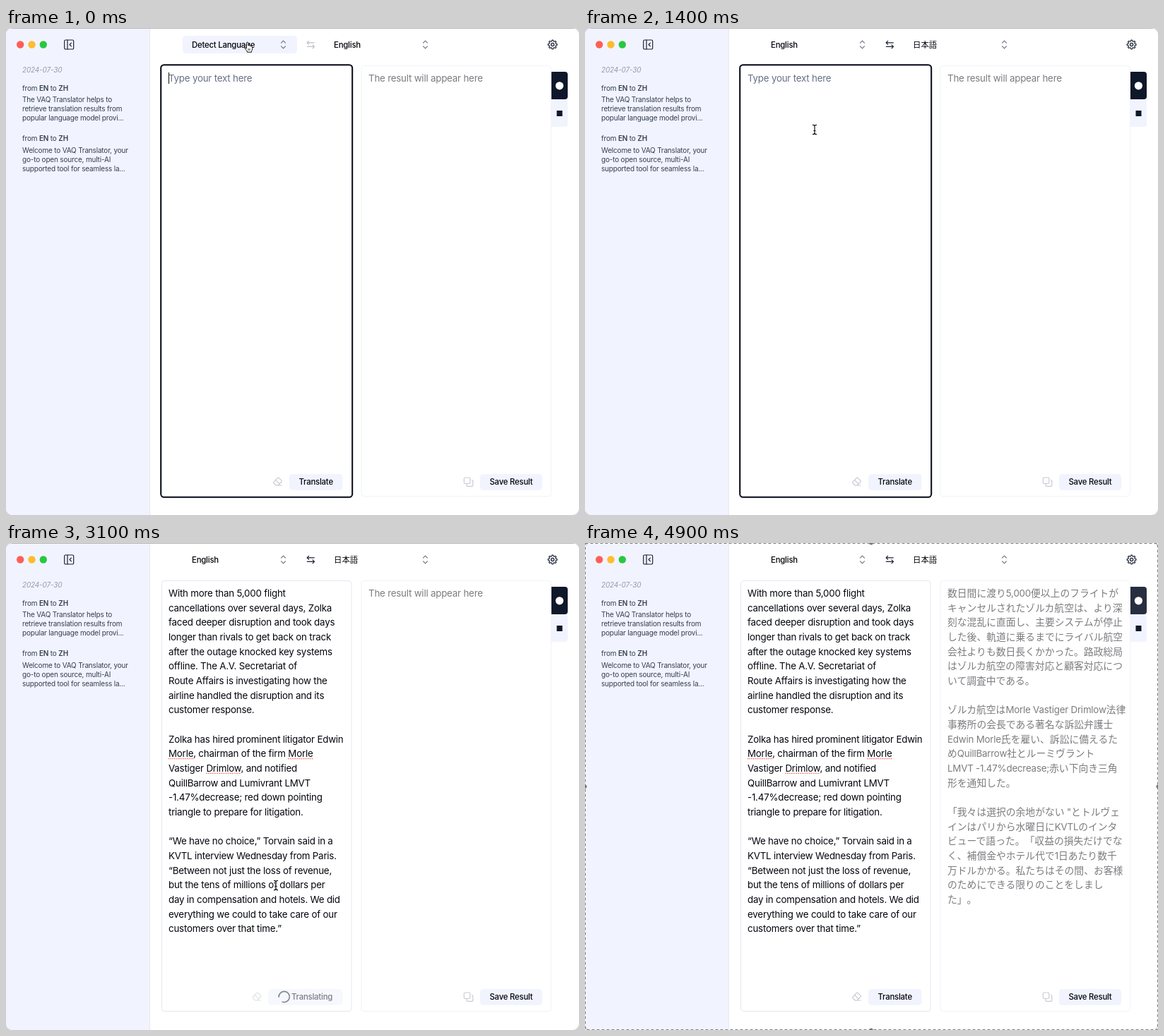
Recreate the animation shown at these times as an HTML page. Size 811 px wide and 690 px high, loop 5000 ms.

```html
<!DOCTYPE html>
<html lang="en">
<head>
<meta charset="utf-8">
<title>Translator</title>
<style>
html, body { margin: 0; width: 100%; height: 100%; overflow: hidden; background: #fff; }
svg { display: block; width: 100%; height: 100%; }
text { font-family: Inter, 'Noto Sans CJK JP', 'Noto Sans CJK', sans-serif; white-space: pre; fill: #04060d; text-spacing-trim: space-all; }
.body { font-size: 13.35px; letter-spacing: -.0165em; }
.ui { font-size: 11.4px; font-weight: 500; letter-spacing: -.02em; }
.menu { font-size: 11.5px; letter-spacing: -.0165em; }
.small { font-size: 10px; letter-spacing: -.0185em; fill: #343d50; }
.cjk { font-family: 'Noto Sans CJK JP', 'Noto Sans CJK', sans-serif; font-size: 1.034em; letter-spacing: 0; }
.ui .cjk { font-size: 1em; }
.hint { fill: #667085; }
.gray { fill: #7b7c7f; }
.icon { fill: none; stroke: #1c2333; stroke-width: 1.2; stroke-linecap: round; stroke-linejoin: round; }
</style>
</head>
<body>
<svg id="stage" viewBox="0 0 811 690" xmlns="http://www.w3.org/2000/svg"></svg>
<script>
const LOOP = 5000, STEP = 50, PITCH = 20.66, TOP = 76;
const INK = '#0f172a', HOVER = '#272e3f', PALE = '#f1f4fe', LINE = '#e4e7f0';

const english = `With more than 5,000 flight
cancellations over several days, Zolka
faced deeper disruption and took days
longer than rivals to get back on track
after the outage knocked key systems
offline. The A.V. Secretariat of
Route Affairs is investigating how the
airline handled the disruption and its
customer response.

Zolka has hired prominent litigator Edwin
_Morle_, chairman of the firm _Morle_
Vastiger _Drimlow_, and notified
QuillBarrow and Lumivrant LMVT
-1.47%decrease; red down pointing
triangle to prepare for litigation.

“We have no choice,” Torvain said in a
KVTL interview Wednesday from Paris.
“Between not just the loss of revenue,
but the tens of millions of dollars per
day in compensation and hotels. We did
everything we could to take care of our
customers over that time.”`;

const japaneseA = `数日間に渡り5,000便以上のフライトが
キャンセルされたゾルカ航空は、より深
刻な混乱に直面し、主要システムが停止
した後、軌道に乗るまでにライバル航空
会社よりも数日長くかかった。路政総局
はゾルカ航空の障害対応と顧客対応につ
いて調査中である。

ゾルカ航空はMorle Vastiger Drimlow法律
事務所の会長である著名な訴訟弁護士
Edwin Morle氏を雇い、訴訟に備えるた
めQuillBarrow社とルーミヴラント
LMVT -1.47%decrease;赤い下向き三角
形を通知した。

「我々は選択の余地がない "とトルヴェ
インはパリから水曜日にKVTLのインタ
ビューで語った。「収益の損失だけでな
く、補償金やホテル代で1日あたり数千
万ドルかかる。私たちはその間、お客様
のためにできる限りのことをしまし
た」。`;

const japaneseB = `数日間で5,000便以上が欠航となり、ゾ
ルカ航空は深刻な混乱に見舞われた。主
要システムが障害で停止した後、通常運
航に戻るまでに競合他社より何日も長く
かかった。路政総局は、同社の混乱への
対処と顧客対応を調査している。

ゾルカ航空は、Morle Vastiger Drimlow
法律事務所の会長で著名な訴訟弁護士の
Edwin Morle氏を起用し、QuillBarrow
とルーミヴラント LMVT -1.47%減少;
赤い下向きの三角形に対し、訴訟の準備
をするよう通知した。

「私たちに選択肢はありません」とトル
ヴェイン氏は水曜日、パリからKVTLの
インタビューで述べた。「収益の損失だ
けでなく、補償とホテルに1日当たり数
千万ドルかかりました。その間、お客様
のために、できることはすべて行いまし
た。」`;

const languages = ['English', 'Español', 'Français', 'Deutsch', '中文', '日本語', '한국어', 'Italiano', 'Nederlands'];

// Markup helpers
const runs = s => s.split(/([\u3000-\u9fff\uac00-\ud7af]+)/)
  .map((r, i) => i % 2 ? `<tspan class="cjk">${r}</tspan>` : r).join('');
const text = (x, y, cls, s, attr = '') => `<text x="${x}" y="${y}" class="${cls}" ${attr}>${runs(s)}</text>`;
const rect = (x, y, w, h, r, fill, attr = '') =>
  `<rect x="${x}" y="${y}" width="${w}" height="${h}" rx="${r}" fill="${fill}" ${attr}/>`;
const icon = (d, attr = '') => `<path class="icon" d="${d}" ${attr}/>`;
const group = (id, inner, attr = '') => `<g id="${id}" ${attr}>${inner}</g>`;
const block = (x, s, cls) => s.split('\n')
  .map((l, i) => text(x, TOP + i * PITCH, 'body ' + cls, l.replace(/_/g, ''))).join('');
const chevrons = x => icon(`M${x - 3} 21.2l3-3 3 3M${x - 3} 25.8l3 3 3-3`, 'style="stroke:#6b7180;stroke-width:1.1"');
const tab = (id, y) => `<path id="${id}" d="M772 ${y}h19q4 0 4 4v31q0 4-4 4h-19z"/>`;

function gear(cx, cy) {
  let d = '';
  for (let i = 0; i < 96; i++) {
    const a = i / 96 * Math.PI * 2;
    const r = 5.6 + .9 * Math.tanh(2.2 * Math.cos(8 * a));
    d += `${i ? 'L' : 'M'}${(cx + r * Math.sin(a)).toFixed(2)} ${(cy - r * Math.cos(a)).toFixed(2)}`;
  }
  return icon(d + 'Z') + `<circle class="icon" cx="${cx}" cy="${cy}" r="2.1"/>`;
}

function menu(id, x, items) {
  const rows = items.map((s, i) => text(x + 30, 96.8 + i * 26, 'menu', s)).join('');
  return group(id,
    rect(x + .5, 40, 161, 280, 4.5, '#fff', `stroke="${LINE}" filter="url(#shadow)"`) +
    `<circle class="icon" cx="${x + 16.3}" cy="57.3" r="4.2" style="stroke:#7b8190"/>` +
    icon(`M${x + 19.5} 60.5l2.8 2.8`, 'style="stroke:#7b8190"') +
    text(x + 30, 62.4, 'menu hint', 'Search Language...') +
    rect(x + 30, 51.5, 1, 13.5, 0, '#111') +
    rect(x + 1, 75, 160, 1, 0, LINE) +
    rect(x + 4, 79.5, 147.5, 25.7, 3, PALE, 'class="row"') +
    rect(x + 155, 77, 6.5, 117.5, 2, '#e4e4ea') +
    icon(`M${x + 12.5} 92.7l2.8 2.8 6-6.2`) + rows);
}

const sidebar = [
  [89.2, 'The VAQ Translator helps to', 'retrieve translation results from', 'popular language model provi...'],
  [160.4, 'Welcome to VAQ Translator, your', 'go-to open source, multi-AI', 'supported tool for seamless la...']
].map(([y, ...lines]) =>
  `<text x="23" y="${y}" class="small">from <tspan font-weight="600">EN</tspan> to <tspan font-weight="600">ZH</tspan></text>` +
  lines.map((l, i) => text(23, y + 16.1 + i * 13, 'small', l)).join('')).join('');

const stage = document.getElementById('stage');
stage.innerHTML = `<defs>
  <filter id="shadow" x="-10%" y="-10%" width="120%" height="120%">
    <feDropShadow dx="0" dy="2" stdDeviation="2" flood-color="#000" flood-opacity=".13"/></filter>
  <clipPath id="win">${rect(0, 0, 811, 690, 9, '#fff')}</clipPath></defs>` +
  rect(0, 0, 811, 690, 0, '#cfd1d4') +
  group('window',
    rect(0, 0, 811, 690, 0, '#fff') + rect(0, 0, 203, 690, 0, PALE) + rect(203, 0, 1, 690, 0, '#e6e9f1') +
    rect(0, 0, 811, 1, 0, '#b4b6ba') +
    ['#ff5f57', '#febc2e', '#28c840'].map((c, i) => `<circle cx="${20.2 + i * 16.3}" cy="23.5" r="5.2" fill="${c}"/>`).join('') +
    rect(82.7, 17, 13, 13, 1.6, 'none', 'class="icon"') + icon('M87 17v13M92.4 21.2l-2.3 2.3 2.3 2.3') +
    text(23, 63, 'small', '2024-07-30', 'font-style="italic" style="fill:#939bab"') + sidebar,
    'clip-path="url(#win)"') +
  rect(250, 11, 162, 25, 4.5, PALE, 'id="hover"') +
  text(263, 27.8, 'ui', 'Detect Language', 'id="from0"') + text(263, 27.8, 'ui', 'English', 'id="from1"') +
  text(464, 27.8, 'ui', 'English', 'id="to0"') + text(464, 27.8, 'ui', '日本語', 'id="to1"') +
  chevrons(392.5) + chevrons(593.5) +
  icon('M436.3 20.8h-10M428.6 18.3l-2.5 2.5 2.5 2.5M426.3 26.3h10M434 23.8l2.5 2.5-2.5 2.5', 'id="swap"') +
  gear(773.6, 23.5) +
  rect(220.5, 53.5, 268.5, 610, 4, '#fff', `id="box" stroke="${LINE}"`) +
  rect(219.2, 52.2, 271, 612.6, 4.5, 'none', 'id="ring" stroke="#080b18" stroke-width="2"') +
  rect(503, 53.5, 268.5, 610, 4, '#fff', 'stroke="#f1f3f8"') +
  text(230, TOP, 'body hint', 'Type your text here', 'id="typeHint"') +
  rect(230, 63, 1, 16, 0, '#111', 'id="caret"') +
  text(513, TOP, 'body gray', 'The result will appear here', 'id="resultHint"') +
  group('input', block(230, english, '')) +
  group('resultA', block(513, japaneseA, 'gray')) + group('resultB', block(513, japaneseB, 'gray')) +
  group('eraser', icon('M382.3 648l-3.2-3.2q-1-1 0-2l5.2-5.2q1-1 2 0l3.6 3.6q1 1 0 2l-4.8 4.8M382.3 648h8M381.6 640.4l5.4 5.4'),
    'style="--c:#c6c9d1"') +
  group('translate', rect(401, 632, 75.5, 22.8, 4.5, PALE) + text(438.7, 647.3, 'ui', 'Translate', 'text-anchor="middle"')) +
  group('busy', rect(371, 632, 105.5, 22.8, 4.5, PALE, 'opacity=".6"') +
    text(404, 647.3, 'ui', 'Translating', 'opacity=".5"') +
    icon('M401.3 643a7.6 7.6 0 1 1-5.2-7.2', 'id="spin" style="stroke:#7f8795;stroke-width:1.7"')) +
  rect(648.3, 637, 8.5, 8.5, 1.4, 'none', 'class="icon" style="stroke:#c9ccd4"') +
  icon('M659.5 640.7q1.3 0 1.3 1.3v6q0 1.3-1.3 1.3h-6.2q-1.3 0-1.3-1.3v-2', 'style="stroke:#c9ccd4"') +
  rect(671, 632, 88, 22.8, 4.5, PALE) + text(715, 647.3, 'ui', 'Save Result', 'text-anchor="middle"') +
  tab('tabB', 101) + tab('tabA', 62) +
  '<circle id="markA" cx="783.4" cy="81.8" r="5.6"/>' + rect(779.5, 117, 8, 8, 0, INK, 'id="markB"') +
  menu('fromMenu', 250, ['Detect Language', ...languages.slice(0, 8)]) + menu('toMenu', 451, languages) +
  group('beam', `<path d="M-3-6.7q3 0 3 2v9.4q0 2-3 2M3-6.7q-3 0-3 2v9.4q0 2 3 2M-1.6 1.5h3.2" fill="none" stroke="#fff" stroke-width="2.6" opacity=".8"/>
    <path d="M-3-6.7q3 0 3 2v9.4q0 2-3 2M3-6.7q-3 0-3 2v9.4q0 2 3 2M-1.6 1.5h3.2" fill="none" stroke="#111" stroke-width="1.2"/>`) +
  group('hand', `<path d="M-2.6 2V-5.6q0-1.3 1.2-1.3t1.2 1.3v3.5q1.7-.9 2.2.4 1.6-.6 2 .6 1.7-.4 1.7 1.2v2.2q0 2-1.2 3.3v1.6h-6.2v-1.3q-2-2-3.6-5 .6-1.7 2.7 1.1z"
    fill="#fff" stroke="#111" stroke-linejoin="round"/><path d="M0 2v3M2 2v3" stroke="#111" stroke-width=".8"/>`) +
  group('arrow', '<path d="M0 0v12l2.8-2.6 1.9 4.3 1.9-.8-1.9-4.2h3.8z" fill="#111" stroke="#fff" stroke-width=".9"/>') +
  group('select', rect(.5, .5, 810, 689, 0, 'none', 'stroke="#fff"') +
    rect(.5, .5, 810, 689, 0, 'none', 'stroke="#7c7c7c" stroke-dasharray="4 3"') +
    [[405, 0], [405, 690], [0, 345], [811, 345]].map(([x, y]) => `<circle cx="${x}" cy="${y}" r="2.6" fill="#777"/>`).join(''));

const el = {};
stage.querySelectorAll('[id]').forEach(n => el[n.id] = n);
el.eraser.firstChild.style.stroke = 'var(--c)';

// Spell-check dots below the marked words
english.split('\n').forEach((line, i) => {
  const node = el.input.children[i];
  line.split('_').reduce((at, part, k) => {
    if (k % 2) {
      const a = node.getStartPositionOfChar(at), b = node.getEndPositionOfChar(at + part.length - 1);
      const dots = document.createElementNS(stage.namespaceURI, 'path');
      dots.setAttribute('d', `M${a.x} ${a.y + 2.4}H${b.x}`);
      dots.setAttribute('stroke', '#f0564c');
      dots.setAttribute('stroke-width', 1.2);
      dots.setAttribute('stroke-dasharray', '1.3 1.3');
      el.input.append(dots);
    }
    return at + part.length;
  }, 0);
});

// Pointer track: time, x, y, shape
const track = [
  [0, 343, 27, 'hand'], [50, 343, 27, 'hand'], [100, 341, 45, 'beam'], [150, 338, 72, 'arrow'],
  [250, 334, 117, 'arrow'], [350, 334, 117, 'arrow'], [400, 360, 92, 'beam'], [550, 490, 27, 'hand'],
  [650, 504, 27, 'hand'], [700, 510, 63, 'beam'], [750, 510, 92, 'arrow'], [1000, 503, 220, 'arrow'],
  [1150, 502, 220, 'arrow'], [1200, 470, 206, 'beam'], [1350, 325, 144, 'beam'], [1550, 325, 144, 'beam'],
  [1700, 420, 600, 'hand'], [1750, 432, 645, 'hand'], [1850, 432, 645, 'beam'], [2050, 382, 485, 'beam'],
  [3300, 382, 485, 'beam'], [3500, 630, 310, 'beam'], [3600, 796, 168, 'arrow'], [3700, 784, 130, 'hand'],
  [3800, 783, 126, 'hand'], [3950, 783, 126, 'hand'], [4100, 783, 91, 'hand'], [5000, 783, 91, 'hand']
];

function pointer(t) {
  let i = 0;
  while (i < track.length - 2 && track[i + 1][0] <= t) i++;
  const [t0, x0, y0, shape] = track[i], [t1, x1, y1] = track[i + 1];
  const u = (t - t0) / (t1 - t0), k = u * u * (3 - 2 * u);
  return { x: x0 + (x1 - x0) * k, y: y0 + (y1 - y0) * k, shape };
}

const show = (id, on) => { el[id].style.display = on ? '' : 'none'; };

function drawMenu(id, t, open, close, y) {
  show(id, t >= open && t <= close);
  el[id].style.opacity = t === open ? .6 : t === close ? .5 : 1;
  const row = y > 80 && y < 312 ? Math.floor((y - 79.5) / 26) : 0;
  el[id].querySelector('.row').setAttribute('y', 79.5 + row * 26);
}

function draw(now) {
  const t = Math.floor(now % LOOP / STEP) * STEP;
  const during = (a, b) => t >= a && t < b;
  const p = pointer(t);

  show('hover', t < 50);
  show('from0', t < 350);
  show('from1', t >= 350);
  show('to0', t < 1150);
  show('to1', t >= 1150);
  el.swap.style.stroke = t < 1150 ? '#bcbfc7' : '';
  show('ring', t < 50 || during(1350, 1800));
  show('caret', t < 50);
  show('typeHint', t < 1550);
  show('input', t >= 1550);

  const busy = during(1800, 3150);
  show('busy', busy);
  show('translate', !busy);
  el.eraser.setAttribute('transform', `translate(${busy ? -29.5 : 0} 0)`);
  el.eraser.style.setProperty('--c', busy ? '#e0e2e8' : '#c6c9d1');
  el.spin.setAttribute('transform', `rotate(${(t - 2200) * 1.8} 393.7 643)`);

  const second = during(3850, 4250);
  show('resultHint', t < 3150);
  show('resultA', t >= 3150 && !second);
  show('resultB', second);
  el.tabA.style.fill = second ? PALE : t >= 4250 ? HOVER : INK;
  el.tabB.style.fill = !second ? PALE : t < 4050 ? HOVER : INK;
  el.markA.style.fill = second ? INK : '#fff';
  el.markB.style.fill = second ? '#fff' : INK;

  drawMenu('fromMenu', t, 50, 350, p.y);
  drawMenu('toMenu', t, 650, 1200, p.y);

  for (const shape of ['beam', 'hand', 'arrow']) {
    show(shape, p.shape === shape && t < 4700);
    el[shape].setAttribute('transform', `translate(${p.x} ${p.y})`);
  }
  show('select', t >= 4700);
  el.select.style.opacity = Math.min(1, (t - 4650) / 200);
}

const start = performance.now();
(function tick() {
  draw(performance.now() - start);
  requestAnimationFrame(tick);
})();
</script>
</body>
</html>
```
